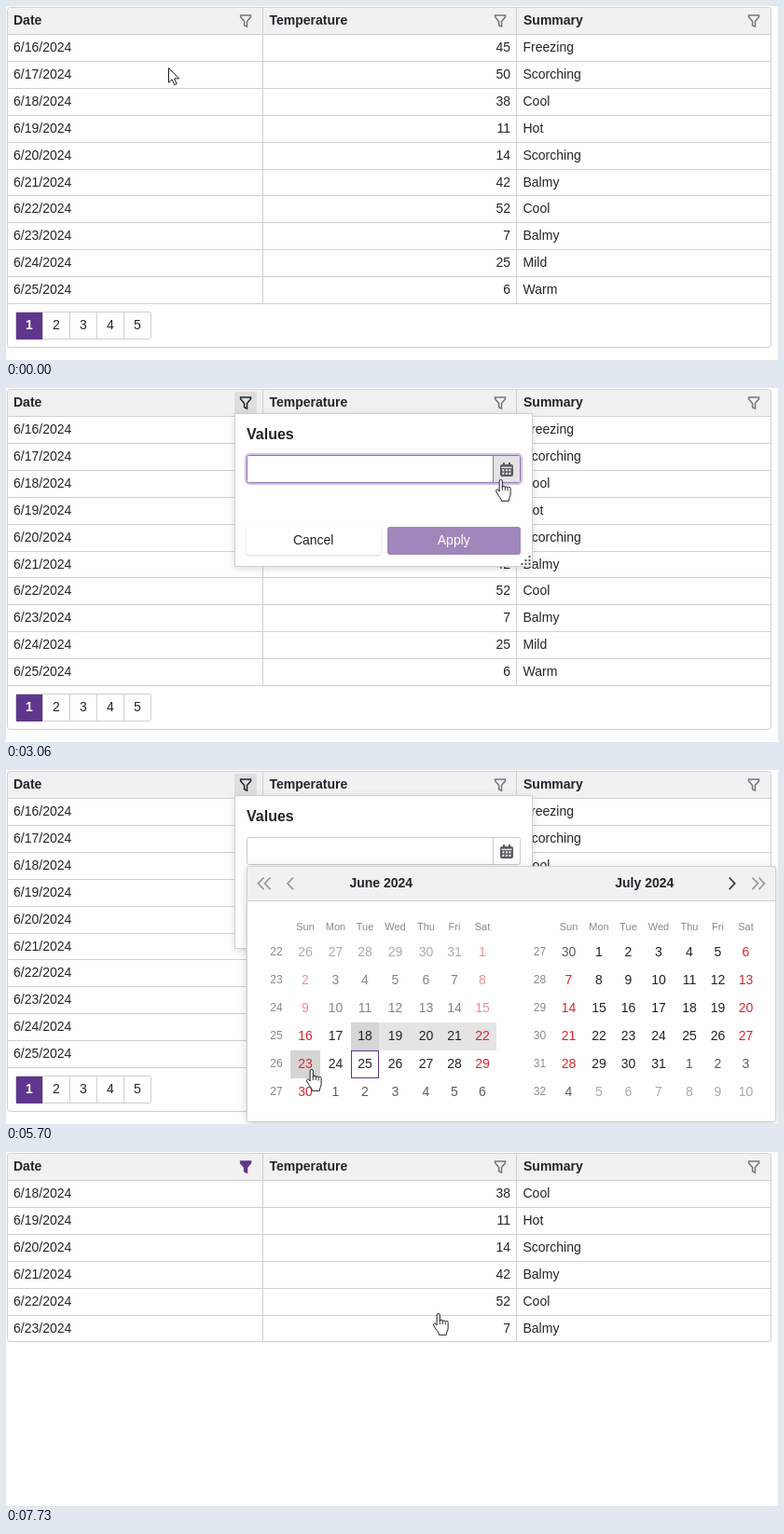
Write an HTML page that moves like this. It is 828 by 380 pixels and loops after 9660 ms.

```html
<!DOCTYPE html>
<html lang="en">
<head>
<meta charset="utf-8">
<title>Grid date filter</title>
<style>
  html, body { margin: 0; width: 100%; height: 100%; overflow: hidden; background: #fefefe; }
  svg { display: block; width: 828px; height: 380px; }
  text { font: 14px "Liberation Sans", Arial, sans-serif; fill: #212529; white-space: pre; }
  .bold { font-weight: 700; }
  .title { font-size: 16px; font-weight: 700; }
  .small { font-size: 11px; fill: #8a8a8a; }
  .week { font-size: 12px; fill: #8a8a8a; }
  .light { fill: #fff; }
  .line { fill: none; stroke: #d0d0d0; shape-rendering: crispEdges; }
  .frame { fill: none; stroke: #d0d0d0; }
  .popup { filter: drop-shadow(0 2px 4px rgba(0, 0, 0, .17)); }
  .button { filter: drop-shadow(0 1px 1px rgba(0, 0, 0, .16)); }
  .funnel, .chevron { fill: none; stroke-width: 1.5; }
  .chevron { stroke-width: 1.8; }
</style>
</head>
<body>
<svg id="stage" viewBox="0 0 828 380"></svg>
<script>
const LOOP = 9660;
const OPEN = 1900, CALENDAR = 3260, BLUR = 4760, PICK = 4860, CHOSEN = 6260, PRESS = 7530, FILTERED = 7730;
const PURPLE = '#5f368d', INK = '#212529', RED = '#d8262f', PAPER = '#fefefe';
const stage = document.getElementById('stage');

function add(parent, tag, attrs = {}, content = '') {
  const node = document.createElementNS('http://www.w3.org/2000/svg', tag);
  for (const key in attrs) node.setAttribute(key, attrs[key]);
  node.textContent = content;
  return parent.appendChild(node);
}
const group = (parent, attrs) => add(parent, 'g', attrs);
const path = (parent, d, attrs) => add(parent, 'path', { d, ...attrs });
const rect = (parent, x, y, width, height, fill, attrs) =>
  add(parent, 'rect', { x, y, width, height, fill, ...attrs });
const label = (parent, x, y, content, cls = '', anchor = 'start') =>
  add(parent, 'text', { x, y, class: cls, 'text-anchor': anchor }, content);
const show = (node, on) => { node.style.display = on ? '' : 'none'; };
const inside = (p, x, y, w, h) => p.x >= x && p.x < x + w && p.y >= y && p.y < y + h;

// Data grid
const temperatures = [45, 50, 38, 11, 14, 42, 52, 7, 25, 6];
const summaries = 'Freezing Scorching Cool Hot Scorching Balmy Cool Balmy Mild Warm'.split(' ');
const rowLine = i => Math.round(30 + 28.9 * i) + .5;

function makeGrid(first, count, height) {
  const grid = group(stage);
  path(grid, 'M2 30V5q0-3 3-3H817q3 0 3 3V30z', { fill: '#f1f1f1' });
  for (let i = 0; i < count; i++) {
    const y = Math.round(30 + 28.9 * i) + 19, day = first + i;
    label(grid, 8, y, `6/${16 + day}/2024`);
    label(grid, 541, y, temperatures[day], '', 'end');
    label(grid, 554.5, y, summaries[day]);
  }
  const lines = count === 10 ? 11 : count;
  for (let i = 0; i < lines; i++) path(grid, `M2 ${rowLine(i)}H820`, { class: 'line' });
  const bottom = rowLine(count);
  path(grid, `M275.5 2V${bottom}M547.5 2V${bottom}`, { class: 'line' });
  rect(grid, 1.5, 1.5, 819, height, 'none', { rx: 3, class: 'frame' });
  return grid;
}

const fullGrid = makeGrid(0, 10, 365);
const shortGrid = makeGrid(2, 6, 202);

const pager = group(fullGrid);
rect(pager, 10.5, 328.5, 145, 29, 'none', { rx: 2, class: 'frame' });
rect(pager, 11, 329, 28, 29, PURPLE);
for (let i = 0; i < 5; i++) {
  if (i) path(pager, `M${10.5 + 29 * i} 329v29`, { class: 'line' });
  label(pager, 25 + 29 * i, 347, i + 1, i ? '' : 'bold light', 'middle');
}

const funnelButton = rect(stage, 245, 4, 24, 24, '#dedede', { rx: 3 });
const funnels = ['Date', 'Temperature', 'Summary'].map((name, i) => {
  label(stage, [8, 282.5, 555][i], 20, name, 'bold');
  return path(stage, 'M.8.8h10.9v1.7L7.7 7.2v5.6L4.8 11.4V7.2L.8 2.5z', {
    class: 'funnel', stroke: '#75757d', transform: `translate(${[250.8, 523.8, 795.8][i]} 9.3)`
  });
});

// Filter popup
const popup = group(stage);
rect(popup, 246, 28, 318, 163, PAPER, { class: 'popup' });
rect(popup, 245.5, 27.5, 319, 164, 'none', { class: 'line' });
label(popup, 258, 55, 'Values', 'title');
const ring = rect(popup, 257, 71, 296, 32, 'none', { rx: 4, stroke: '#cfc1e2', 'stroke-width': 2 });
const field = rect(popup, 258.5, 72.5, 293, 29, PAPER, { rx: 2 });
const dropButton = path(popup, 'M523 73h26q2 0 2 2v24q0 2-2 2h-26z', { fill: '#e3e3e3' });
const divider = path(popup, 'M522.5 73v29', { 'shape-rendering': 'crispEdges' });

const calendarIcon = group(popup, { transform: 'translate(530 80)' });
path(calendarIcon, 'M3 0h2v2h4V0h2v2h1q2 0 2 2v9q0 2-2 2H2q-2 0-2-2V4q0-2 2-2h1z', { fill: '#5a5a60' });
path(calendarIcon, 'M1.5 5.3h11', { stroke: '#fff', 'stroke-width': 1.2 });
for (let i = 0; i < 6; i++)
  rect(calendarIcon, 2.4 + 3.5 * (i % 3), 7.3 + 3.5 * (i > 2), 2, 2, '#fff');

const value = group(popup);
label(value, 265, 91, '6/18/2024 - 6/23/2024');
add(value, 'circle', { cx: 508, cy: 87, r: 8, fill: '#cfcfcf' });
path(value, 'M505 84l6 6m0-6l-6 6', { stroke: '#fff', 'stroke-width': 1.6 });

rect(popup, 258, 149, 144, 30, PAPER, { rx: 3, class: 'button' });
label(popup, 329.7, 168, 'Cancel', '', 'middle');
const apply = rect(popup, 409, 149, 143, 30, PURPLE, { rx: 3 });
label(popup, 480.3, 168, 'Apply', 'light', 'middle');
for (let row = 0; row < 3; row++)
  for (let i = 0; i <= row; i++) rect(popup, 560.5 - 4 * i, 180 + 4 * row, 2, 2, '#55555c');

// Calendar
const calendar = group(stage);
rect(calendar, 258, 103, 568, 275, PAPER, { rx: 2, class: 'popup' });
rect(calendar, 258, 103, 568, 37, '#f1f1f1', { rx: 2 });
path(calendar, 'M258 140.5H826', { class: 'line' });
rect(calendar, 258.5, 103.5, 567, 274, 'none', { rx: 2, class: 'frame' });
const chevron = (x, dir, color) =>
  path(calendar, `M${x - 3 * dir} 115.5l${6 * dir} 6.3l${-6 * dir} 6.3`, { class: 'chevron', stroke: color });
[[273.5, -1], [280.5, -1], [305, -1], [803.5, 1], [810.5, 1]].forEach(([x, dir]) => chevron(x, dir, '#9c9ca0'));
chevron(778.7, 1, '#3c3c40');

const columns = [305, 337, 370, 400, 435, 466, 496, 526];
const days = [];
const today = 30, anchor = 23;

function dayColor(date, month, column) {
  const enabled = date >= new Date(2024, 5, 16) && date <= new Date(2024, 7, 4);
  if (date.getMonth() !== month) return enabled ? '#5c5c60' : '#ababab';
  if (column % 6 === 0) return enabled ? RED : '#ec9095';
  return enabled ? INK : '#858585';
}

function makeMonth(month, name, left, firstWeek, firstDay) {
  const title = label(calendar, left + 402.3, 126, name, 'bold', 'middle');
  for (let i = 0; i < 42; i++) {
    const col = i % 7, row = Math.floor(i / 7);
    const x = left + columns[col], w = columns[col + 1] - columns[col], y = 181 + 30 * row;
    const date = new Date(2024, month, firstDay + i);
    if (!row) label(calendar, x + w / 2, 172, 'Sun Mon Tue Wed Thu Fri Sat'.split(' ')[col], 'small', 'middle');
    if (!col) label(calendar, left + 290, y + 18, firstWeek + row, 'week', 'middle');
    const cell = rect(calendar, x, y, w, 30, 'none');
    label(calendar, x + w / 2, y + 19, date.getDate(), '', 'middle').style.fill = dayColor(date, month, col);
    const enabled = date >= new Date(2024, 5, 16) && date <= new Date(2024, 7, 4);
    days.push({ cell, x, y, w, enabled });
  }
  return title;
}
const titles = [makeMonth(5, 'June 2024', 0, 22, -5), makeMonth(6, 'July 2024', 282.5, 27, 0)];
rect(calendar, 370.5, 301.5, 29, 29, 'none', { stroke: PURPLE });

// Pointer
const outline = { fill: '#fff', stroke: '#1c1c24', 'stroke-linejoin': 'round' };
const arrow = path(stage, 'M.5.6v15.6l3.6-3.4 2.6 5.8 2.4-1-2.5-5.7h5z', outline);
const hand = group(stage);
path(hand, 'M-.9 13V2a1.6 1.6 0 0 1 3.2 0V8.4a1.5 1.5 0 0 1 3 .5a1.5 1.5 0 0 1 2.9 .6a1.5 1.5 0 0 1 2.9 1V16'
  + 'c0 3-1.7 4-1.8 7.3H1.4c-.3-3-2.6-4.3-4-7.3l-1.8-3.2C-5 11-2.6 10.3-1.7 11.6z', outline);
path(hand, 'M2.3 8v4M5.3 9v3M8.2 10v2.5', { stroke: '#1c1c24', 'stroke-width': .9 });

const smooth = k => k * k * (3 - 2 * k);
const settle = k => 1 - (1 - k) * (1 - k);
const legs = [ // start, end, target x, target y, easing
  [930, 1430, 254, 19, smooth],
  [1729, 1730, 253, 18, smooth],
  [2230, 2560, 461, 93, smooth],
  [2560, 3060, 530, 98, settle],
  [3800, 4530, 387, 280, smooth],
  [5100, 5700, 327, 321, smooth],
  [6700, 7060, 450, 196, smooth],
  [7060, 7360, 463, 173, settle]
];

function pointerAt(t) {
  let x = 174, y = 66;
  for (const [start, end, toX, toY, ease] of legs) {
    if (t < start) break;
    const k = ease(Math.min(1, (t - start) / (end - start)));
    x += (toX - x) * k;
    y += (toY - y) * k;
  }
  return { x: Math.round(x), y: Math.round(y) };
}

function paintDays(t, hovered) {
  const picking = t >= PICK;
  const end = picking && hovered >= 0 ? hovered : anchor;
  const low = Math.min(anchor, end), high = Math.max(anchor, end);
  days.forEach(({ cell }, i) => {
    let fill = 'none';
    if (picking) {
      if (i === anchor || i === end) fill = '#d5d5d5';
      else if (i > low && i < high) fill = '#e4e4e4';
    } else if (i === today) fill = '#e3e3e3';
    else if (i === hovered) fill = '#f1f1f1';
    cell.setAttribute('fill', fill);
  });
}

function render(t) {
  const p = pointerAt(t);
  const open = t >= OPEN && t < FILTERED;
  const calendarOpen = t >= CALENDAR && t < CHOSEN;
  const filtered = t >= FILTERED;
  const focused = t < BLUR || (t >= CHOSEN && t < PRESS);
  const overFunnel = inside(p, 245, 4, 24, 24);
  const overDrop = open && inside(p, 523, 72, 29, 31);
  const overApply = t >= CHOSEN && inside(p, 409, 149, 143, 30);
  const overTitle = calendarOpen && inside(p, 320, 104, 440, 36);
  const hovered = calendarOpen
    ? days.findIndex(d => d.enabled && inside(p, d.x, d.y, d.w, 30)) : -1;

  show(fullGrid, !filtered);
  show(shortGrid, filtered);
  show(funnelButton, open || overFunnel);
  funnels[0].style.stroke = filtered ? PURPLE : open || overFunnel ? INK : '';
  funnels[0].style.fill = filtered ? PURPLE : '';

  show(popup, open);
  show(ring, focused);
  const edge = focused ? '#8f76b3' : '#cbcbcb';
  field.setAttribute('stroke', edge);
  divider.setAttribute('stroke', edge);
  show(dropButton, overDrop);
  show(value, t >= CHOSEN);
  apply.setAttribute('fill', t < CHOSEN ? '#a086bb' : overApply ? '#502d77' : PURPLE);

  show(calendar, calendarOpen);
  titles.forEach(title => { title.style.fill = overTitle ? PURPLE : ''; });
  if (calendarOpen) paintDays(t, hovered);

  const pointing = overFunnel || overDrop || overApply || overTitle || hovered >= 0;
  show(hand, pointing);
  show(arrow, !pointing);
  (pointing ? hand : arrow).setAttribute('transform', `translate(${p.x} ${p.y})`);
}

function tick() {
  render(performance.now() % LOOP);
  requestAnimationFrame(tick);
}
tick();
</script>
</body>
</html>
```
